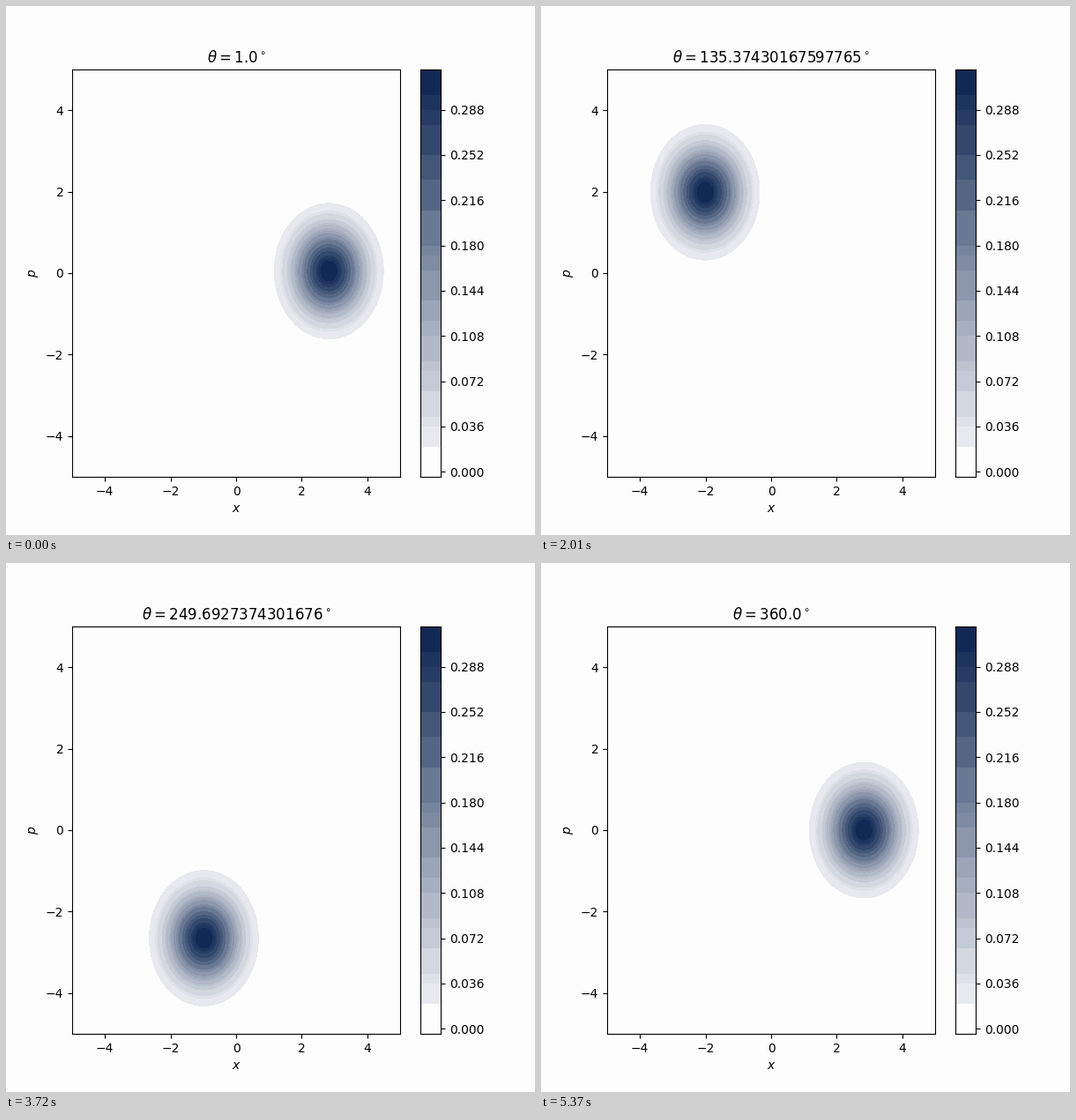
Animation, 600 px wide and 600 px high, one loop 5.4 s. Source, as a matplotlib script:

```python
import numpy as np
import matplotlib.pyplot as plt
from matplotlib.animation import FuncAnimation
from matplotlib.patches import Ellipse

FRAMES, INTERVAL = 180, 30
PAPER = "#fdfdfd"
DEEP = np.array([9, 34, 79]) / 255
STEP, LAYERS = 0.004, 81
# Layer indices where the shade changes
EDGES = [0, 6, 10, 12, 17, 21, 23, 28, 31, 35, 41, 44, 46, 53, 59, 64, 70, 73, 76, 81]
RADIUS = 2 * np.sqrt(2)

thetas = np.linspace(1, 360, FRAMES)


def level(i):
    return (i - 1) * STEP


def shade(lo, hi):
    if lo == 0:
        return PAPER
    t = (lo + hi) / 2 / LAYERS
    return tuple(1 + (DEEP - 1) * t)


plt.rcParams["font.family"] = "DejaVu Sans"
fig = plt.figure(figsize=(6, 6), dpi=100, facecolor=PAPER)
ax = fig.add_axes([0.125, 0.11, 0.62, 0.77], facecolor=PAPER)
ax.set(xlim=(-5, 5), ylim=(-5, 5), xlabel="$x$", ylabel="$p$")
ax.set_xticks(range(-4, 5, 2))
ax.set_yticks(range(-4, 5, 2))
title = ax.set_title("")

cax = fig.add_axes([0.78375, 0.11, 0.0385, 0.77], facecolor=PAPER)
cax.set(xlim=(0, 1), ylim=(level(0), level(LAYERS)), xticks=[])
cax.yaxis.tick_right()
cax.set_yticks(np.arange(9) * 0.036)
cax.yaxis.set_major_formatter("{x:.3f}")

rings = []
for lo, hi in zip(EDGES, EDGES[1:]):
    color = shade(lo, hi)
    cax.axhspan(level(lo), level(hi), color=color, lw=0, antialiased=False)
    if lo == 0:
        continue
    # Radius at which exp(-r^2) / pi falls to this level
    size = 2 * np.sqrt(-np.log(np.pi * level(lo)))
    ring = Ellipse((0, 0), size, size, facecolor=color, lw=0, antialiased=False)
    rings.append(ax.add_patch(ring))


def update(i):
    theta = thetas[i]
    angle = np.radians(theta)
    center = (RADIUS * np.cos(angle), RADIUS * np.sin(angle))
    for ring in rings:
        ring.set_center(center)
    title.set_text(rf"$\theta = {float(theta)}^\circ$")
    return [*rings, title]


anim = FuncAnimation(fig, update, frames=FRAMES, interval=INTERVAL, repeat=True)
plt.show()
```
